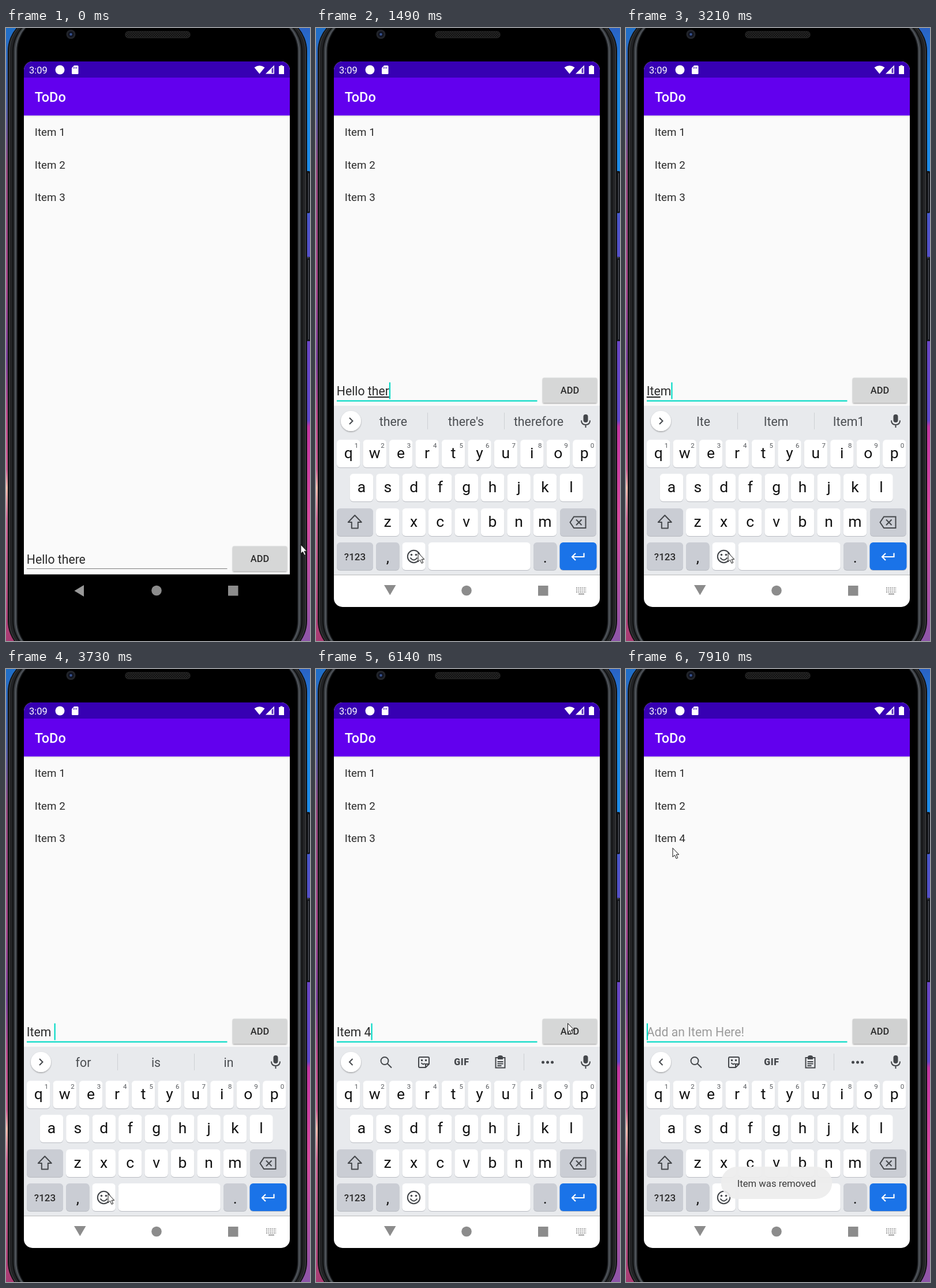
Recreate the animation shown at these times as an HTML page. Size 527 px wide and 1063 px high, loop 8000 ms.

```html
<!DOCTYPE html>
<html lang="en">
<head>
<meta charset="utf-8">
<title>ToDo</title>
<style>
  html, body { margin: 0; width: 100%; height: 100%; overflow: hidden; background: #000; }
  svg { display: block; width: 527px; height: 1063px; }
  text { font-family: Roboto, "Noto Sans", sans-serif; fill: #2b2b2b; }
  .mid { text-anchor: middle; }
  .item { font-size: 18.8px; }
  .field { font-size: 21.2px; }
  .word { font-size: 21.3px; fill: #4b4e52; }
  .key { font-size: 26.5px; fill: #111; }
  .sup { font-size: 11.5px; fill: #55585c; }
  .line { fill: none; stroke: #44474b; stroke-width: 2; }
  .solid { fill: #44474b; }
  .nav { fill: #8c8c8c; }
</style>
</head>
<body>
<svg viewBox="0 0 527 1063" xmlns="http://www.w3.org/2000/svg">
  <defs>
    <linearGradient id="left" x2="0" y2="1">
      <stop offset="0" stop-color="#1f6fc8"/><stop offset=".12" stop-color="#4a62ae"/>
      <stop offset=".23" stop-color="#96497f"/><stop offset=".42" stop-color="#a8478c"/>
      <stop offset=".54" stop-color="#7b409c"/><stop offset=".63" stop-color="#bd4a8c"/>
      <stop offset=".72" stop-color="#cf5f95"/><stop offset=".75" stop-color="#f4bfae"/>
      <stop offset=".8" stop-color="#d06a98"/><stop offset="1" stop-color="#a83a72"/>
    </linearGradient>
    <linearGradient id="right" x2="0" y2="1">
      <stop offset="0" stop-color="#2a62c4"/><stop offset=".08" stop-color="#1a86e0"/>
      <stop offset=".23" stop-color="#1c8be8"/><stop offset=".31" stop-color="#4a55c8"/>
      <stop offset=".5" stop-color="#6a45c4"/><stop offset=".64" stop-color="#5c48c8"/>
      <stop offset=".65" stop-color="#c235a0"/><stop offset=".8" stop-color="#d64a9e"/>
      <stop offset="1" stop-color="#8c55a8"/>
    </linearGradient>
    <linearGradient id="shade" x2="0" y2="1">
      <stop offset="0" stop-opacity=".12"/><stop offset="1" stop-opacity="0"/>
    </linearGradient>
    <pattern id="mesh" width="4" height="4" patternUnits="userSpaceOnUse">
      <path fill="#262626" d="M0 0h4v4h-4z"/><path fill="#111" d="M0 0h2v2h-2zM2 2h2v2h-2z"/>
    </pattern>
    <clipPath id="screen"><rect x="31" y="58" width="461" height="946" rx="15"/></clipPath>
    <filter id="soft" x="-20%" y="-20%" width="140%" height="150%">
      <feDropShadow dx="0" dy="1.3" stdDeviation="1" flood-opacity=".35"/>
    </filter>
  </defs>

  <rect width="264" height="1063" fill="url(#left)"/>
  <rect x="263" width="264" height="1063" fill="url(#right)"/>
  <path fill="#14161b" d="M518 248h7q2 0 2 2v69q0 2-2 2h-7zM518 397h9v146h-9z"/>
  <path stroke="#5a5e66" d="M522 398.500h4M524.500 252v66M524.500 402v138"/>
  <g id="body"></g>
  <circle cx="112.500" cy="11" r="8" fill="#22242a"/>
  <circle cx="112.500" cy="11" r="5" fill="#10131f"/>
  <circle cx="112.500" cy="11" r="2.300" fill="#35508c"/>
  <rect x="207" y="6" width="112" height="11" rx="5" fill="url(#mesh)" stroke="#2c2c2c"/>

  <g clip-path="url(#screen)">
    <rect x="31" y="58" width="461" height="890" fill="#fafafa"/>
    <rect x="31" y="151.500" width="461" height="3.500" fill="url(#shade)"/>
    <rect x="31" y="86" width="461" height="65.700" fill="#6200ee"/>
    <rect x="31" y="58" width="461" height="28" fill="#3700b3"/>
    <g fill="#fff">
      <text x="40" y="79" font-size="16.500" style="fill:#fff">3:09</text>
      <circle cx="93.500" cy="72.500" r="8"/>
      <path d="M118 65h6q1.500 0 1.500 1.500v12q0 1.500-1.500 1.500h-8.500q-1.500 0-1.500-1.500v-9z"/>
      <path d="M430.500 68.500q9-6.500 18 0l-9 11z"/>
      <path d="M465 64.500v15h-15z"/>
      <path d="M475.500 66v-1.500h4v1.500h2.500v14h-9v-14z"/>
    </g>
    <path stroke="#3700b3" d="M117.500 67.500v3M120 67.500v3M122.500 67.500v3"/>
    <path fill="#3700b3" opacity=".8" d="M463.500 68v10h-3v-7z"/>
    <text x="49.800" y="128.300" font-size="23.500" font-weight="500" style="fill:#fff">ToDo</text>
    <g id="list"></g>

    <g id="entry">
      <rect id="rule" x="36" width="347.500"/>
      <text id="typed" class="field" x="35.800" y="637"></text>
      <rect id="caret" y="614.500" width="2.200" height="29" fill="#03dac5"/>
      <rect id="button" x="393" y="606.500" width="94" height="43.500" rx="2" filter="url(#soft)"/>
      <text class="mid" x="440" y="634.300" font-size="16.400" font-weight="500">ADD</text>
    </g>

    <g id="navDark" fill="#999">
      <rect x="31" y="947.500" width="461" height="57" fill="#000"/>
      <path d="M118.500 976l16.500-10v20z"/>
    </g>
    <g id="keyboard">
      <rect x="31" y="655" width="461" height="293.500" fill="#e8eaed"/>
      <rect x="31" y="948.500" width="461" height="56" fill="#fff"/>
      <path class="nav" d="M118 966h20.500l-10.200 17.500z"/>
      <path stroke="#9a9a9a" stroke-width="2" stroke-dasharray="2 1.500"
        d="M451 971h18M451 974.500h18M451 978h18"/>
      <path stroke="#9a9a9a" stroke-width="2" d="M455 981.500h10"/>
      <g id="keys"></g>
      <path class="line" d="M67.300 845l-11.500 12h6v10.500h11v-10.500h6z" stroke-linejoin="round"/>
      <path class="line" d="M447 847.500h20.500v19.500h-20.500l-6.500-9.700zM451 852.500l9.500 9.500M460.500 852.500l-9.500 9.500"/>
      <circle class="line" cx="169.500" cy="916.500" r="10.700"/>
      <circle class="solid" cx="165.500" cy="913.500" r="1.800"/>
      <circle class="solid" cx="173.500" cy="913.500" r="1.800"/>
      <path class="line" d="M163.500 918.500q6 8 12 0"/>
      <path fill="none" stroke="#fff" stroke-width="2.200" d="M464.500 910.500v6.500h-20M450 911l-6 6 6 6"/>
      <circle cx="60.500" cy="681.500" r="17.500" fill="#fff" filter="url(#soft)"/>
      <path id="chevron" class="line"/>
      <rect class="solid" x="463.500" y="670" width="8" height="14" rx="4"/>
      <path class="line" d="M460 680.500q0 7.500 7.500 7.500t7.500-7.500M467.500 688v5"/>
      <g id="words"></g>
      <g id="tools">
        <circle class="line" cx="119" cy="679.500" r="6.500"/>
        <path class="line" stroke-width="2.500" d="M123.500 684l7.500 7.500"/>
        <path class="line" d="M180 673h14q2 0 2 2v10l-6 6h-10q-2 0-2-2v-14q0-2 2-2zM196 685h-6v6M182.500 683q3 4 6 1"/>
        <path class="solid" d="M182 677h3v3h-3zM189 677h3v3h-3z"/>
        <text class="mid" x="252.500" y="687" font-size="16" font-weight="900" letter-spacing=".6" style="fill:#44474b">GIF</text>
        <path class="line" d="M311.500 674h16v17.500h-16zM314.500 681h10M314.500 684.500h10M314.500 688h7"/>
        <path class="solid" d="M315 673q0-3 4.500-3t4.500 3v4h-9z"/>
        <path stroke="#cdd0d4" d="M360.500 667v29"/>
        <circle class="solid" cx="393.500" cy="682" r="2.500"/>
        <circle class="solid" cx="401.500" cy="682" r="2.500"/>
        <circle class="solid" cx="409.500" cy="682" r="2.500"/>
      </g>
    </g>
    <g class="nav">
      <circle cx="261" cy="975.500" r="8.800"/>
      <rect x="385" y="967" width="17.500" height="17.500"/>
    </g>
    <g id="toast">
      <rect id="pill" y="863" height="56" rx="28" fill="#ededed"/>
      <text id="note" class="mid" x="261" y="897.500" font-size="16.700"></text>
    </g>
  </g>
  <path id="mouse" fill="#fff" stroke="#111" d="M.5.5v15.500l3.500-3.300 2.600 6 2.600-1.100-2.600-5.800h4.600z"/>
</svg>
<script>
const $ = id => document.getElementById(id);
const LOOP = 8000;

// [time, changes]; every step keeps what earlier steps set
const steps = [
  [0, { open: false, items: [1, 2, 3], text: 'Hello there', marked: '', caret: false,
        words: null, button: '#d6d7d7', toast: '', fade: 0, mouse: [510.500, 895.500] }],
  [150, { mouse: [500, 925] }],
  [270, { mouse: [472, 985] }],
  [390, { mouse: [446, 1044] }],
  [510, { mouse: null }],
  [1490, { open: true, text: 'Hello ', marked: 'ther', caret: true,
           words: ['there', "there's", 'therefore'], mouse: [176.500, 909.500] }],
  [1610, { marked: 't', words: ['the', 'to', "there's"] }],
  [1760, { text: '', marked: 'He', words: ['He', 'Hey', 'Her'] }],
  [1880, { marked: '', words: null }],
  [2440, { caret: false }],
  [2690, { text: 'I', caret: true }],
  [2940, { text: '', marked: 'I', words: ['I', "I'm", 'It'] }],
  [3060, { marked: 'It', words: ['It', "It's", 'Its'] }],
  [3210, { marked: 'Ite', tail: 'm', words: ['Ite', 'Item', 'Item1'] }],
  [3360, { marked: 'Item', tail: '', words: ['Item1', 'Item', 'Items'] }],
  [3610, { text: 'Item ', marked: '' }],
  [3730, { words: ['for', 'is', 'in'] }],
  [4290, { caret: false }],
  [4850, { text: 'Item 4', caret: true }],
  [5130, { words: null }],
  [5410, { caret: false, mouse: [188, 909] }],
  [5560, { mouse: [329, 855] }],
  [5710, { mouse: [407, 671] }],
  [5860, { caret: true, mouse: [436, 607] }],
  [6140, { mouse: [436, 614] }],
  [6260, { mouse: [436.500, 622] }],
  [6410, { button: '#c8c9c9' }],
  [6530, { items: [1, 2, 3, 4], text: '' }],
  [6650, { toast: 'Item was added', fade: .65 }],
  [6770, { button: '#d0d1d1', fade: .92 }],
  [6920, { mouse: [438, 660] }],
  [7040, { caret: false, mouse: [441, 787] }],
  [7190, { mouse: [443.500, 969] }],
  [7340, { caret: true, mouse: null }],
  [7760, { items: [1, 2, 4], toast: 'Item was removed', mouse: [75, 293] }],
  [7910, { mouse: [80.500, 310] }]
];
let last = {};
const states = steps.map(([at, change]) => last = { ...last, ...change, at });

const label = (x, y, cls, str) => `<text class="${cls}" x="${x}" y="${y}">${str}</text>`;

function buildBody() {
  const layers = [[0, '#0e0f10'], [2, '#3a3c3e'], [3.500, '#222325'], [8, '#111213'],
                  [10.500, '#3a3e43'], [13, '#53585e'], [15, '#1f2124'], [17, '#000']];
  $('body').innerHTML = layers.map(([d, color]) =>
    `<rect x="${3 + d}" y="-21" width="${519 - 2 * d}" height="1110" rx="61" fill="${color}"/>`
  ).join('');
}

function buildKeys() {
  const pitch = 45.450, dim = '#cacdd4';
  const cap = (x, y, w = 40.500, fill = '#fff') =>
    `<rect x="${x}" y="${y + 1}" width="${w}" height="48" rx="6" fill="#b9bcc2"/>` +
    `<rect x="${x}" y="${y}" width="${w}" height="48" rx="6" fill="${fill}"/>`;
  const row = (chars, x, y, sup) => [...chars].map((ch, i) => {
    const left = x + i * pitch;
    return cap(left, y) + label(left + 20.200, y + 31.500, 'key mid', ch) +
      (sup ? label(left + 34, y + 13.500, 'sup mid', (i + 1) % 10) : '');
  }).join('');
  $('keys').innerHTML =
    row('qwertyuiop', 36, 714, true) + row('asdfghjkl', 58.700, 773) + row('zxcvbnm', 104, 833) +
    cap(36, 833, 63, dim) + cap(423, 833, 63, dim) +
    cap(36, 892, 63, dim) + cap(104, 892, 40.500, dim) + cap(149.300, 892) +
    cap(194.700, 892, 177) + cap(377, 892, 40.500, dim) + cap(422.500, 892, 64, '#1a73e8') +
    '<text class="mid" x="67.500" y="923" font-size="17" font-weight="500">?123</text>' +
    label(124.300, 926.500, 'key mid', ',') + label(397.300, 926.500, 'key mid', '.');
}

function drawEntry(s) {
  const { text, marked, tail = '' } = s;
  const typed = $('typed'), empty = !(text + marked + tail);
  const keep = str => str.replace(/ /g, '\u00a0');
  typed.innerHTML = empty ? 'Add an Item Here!'
    : keep(text) + `<tspan text-decoration="underline">${marked}</tspan>` + tail;
  typed.style.fill = empty ? '#9b9b9b' : '';
  $('caret').setAttribute('x', 35.800 + (empty ? 0 : typed.getComputedTextLength()));
  $('entry').setAttribute('transform', `translate(0 ${s.open ? 0 : 292})`);
  const rule = $('rule');
  rule.setAttribute('y', s.open ? 645.500 : 645);
  rule.setAttribute('height', s.open ? 2.200 : 1.100);
  rule.setAttribute('fill', s.open ? '#03dac5' : '#858585');
  $('button').setAttribute('fill', s.button);
}

function show(id, on) { $(id).style.display = on ? '' : 'none'; }

function draw(s) {
  $('list').innerHTML = s.items.map((n, i) => label(49.800, 187.300 + i * 56.200, 'item', 'Item ' + n)).join('');
  drawEntry(s);
  show('caret', s.caret);
  show('keyboard', s.open);
  show('navDark', !s.open);
  show('tools', !s.words);
  $('words').innerHTML = s.words
    ? s.words.map((w, i) => label(134 + i * 126, 690, 'word mid', w)).join('') +
      '<path stroke="#cdd0d4" d="M193.500 667v29M326.500 667v29"/>' : '';
  $('chevron').setAttribute('d', s.words ? 'M58 676l5.500 5.500-5.500 5.500' : 'M63.500 676l-5.500 5.500 5.500 5.500');
  show('toast', s.toast);
  if (s.toast) {
    const note = $('note'), pill = $('pill');
    note.textContent = s.toast;
    const w = note.getComputedTextLength() + 56;
    pill.setAttribute('x', 261 - w / 2);
    pill.setAttribute('width', w);
    $('toast').style.opacity = s.fade;
  }
  show('mouse', s.mouse);
  if (s.mouse) $('mouse').setAttribute('transform', `translate(${s.mouse})`);
}

buildBody();
buildKeys();
const start = performance.now();
let shown;
function tick() {
  const t = (performance.now() - start) % LOOP;
  const s = states.findLast(state => state.at <= t);
  if (s !== shown) draw(shown = s);
  requestAnimationFrame(tick);
}
tick();
</script>
</body>
</html>
```
